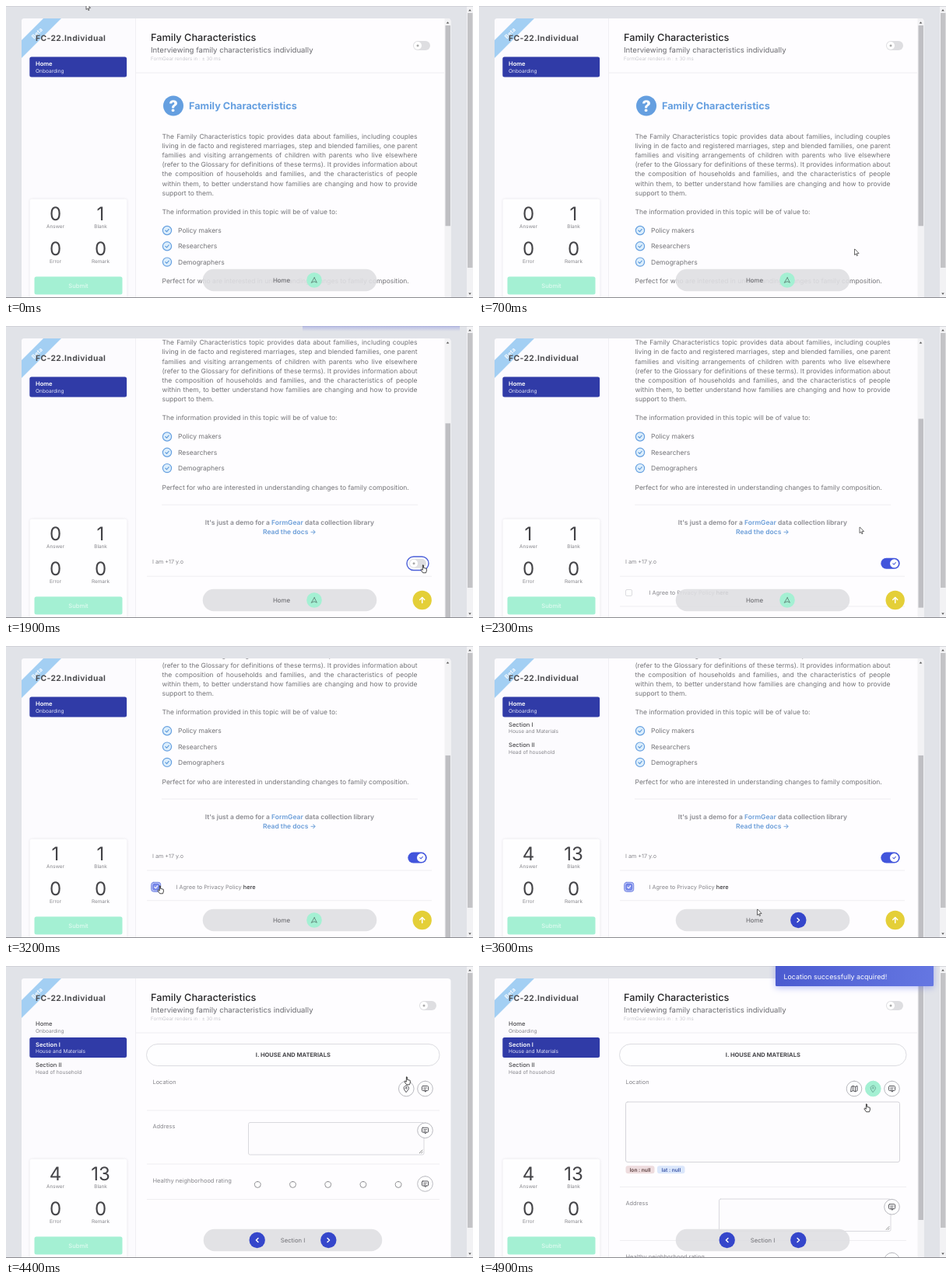
Animation, 600 px wide and 376 px high, one loop 5000 ms. Source, as an HTML page with a canvas:

```html
<!DOCTYPE html>
<html lang="en">
<head>
<meta charset="utf-8">
<title>Family Characteristics form</title>
<style>
html, body { margin: 0; width: 100%; height: 100%; overflow: hidden; background: #e1e3e8; }
canvas { display: block; width: 600px; height: 376px; }
</style>
</head>
<body>
<canvas id="stage"></canvas>
<script>
const canvas = document.getElementById('stage');
const ctx = canvas.getContext('2d');
const ratio = window.devicePixelRatio || 1;
canvas.width = 600 * ratio;
canvas.height = 376 * ratio;
ctx.textRendering = 'geometricPrecision';

const LOOP = 5000, STEP = 100;
const BLUE = '#303ba7', BUTTON = '#3546cb', SKY = '#659fe0', MINT = '#a4f0d3', LINE = '#efeef1';
const INK = '#4c4c4f', BODY = '#737377', SOFT = '#87878c';

// Keys: [time, value, ...]; values between keys are linear.
const SCROLL = [[800, 0], [1200, 43], [1500, 105], [1700, 146.5], [2300, 146.5], [2600, 179.7]];
const PAGE = [[3800, 0], [4000, -13], [4200, -13], [4400, 0]];
const TOAST = [[4600, -30], [4900, 0]];
const MOUSE = [[0, 103, -3], [300, 240, 110], [600, 478, 316], [800, 487, 310], [1200, 527, 224],
  [1500, 529, 240], [1900, 535, 308], [2000, 535, 308], [2300, 489, 259], [2600, 340, 280],
  [3000, 197, 309], [3300, 197, 309], [3700, 411, 349], [3800, 411, 349], [4100, 391, 318],
  [4400, 514, 143], [4600, 512, 152], [4900, 497, 178]];

const PARAGRAPH = [
  'The Family Characteristics topic provides data about families, including couples',
  'living in de facto and registered marriages, step and blended families, one parent',
  'families and visiting arrangements of children with parents who live elsewhere',
  '(refer to the Glossary for definitions of these terms). It provides information about',
  'the composition of households and families, and the characteristics of people',
  'within them, to better understand how families are changing and how to provide',
  'support to them.'
];

function track(keys, t, i = 1) {
  if (t <= keys[0][0]) return keys[0][i];
  for (let k = 1; k < keys.length; k++) {
    const a = keys[k - 1], b = keys[k];
    if (t <= b[0]) {
      const p = (t - a[0]) / (b[0] - a[0]);
      return a[i] + (b[i] - a[i]) * p;
    }
  }
  return keys[keys.length - 1][i];
}

function setFont(size, weight) {
  ctx.font = `${weight} ${size}px Inter, sans-serif`;
}

// y is the middle of the capitals.
function text(str, x, y, size, color = INK, weight = 400, align = 'left') {
  setFont(size, weight);
  ctx.fillStyle = color;
  ctx.textAlign = align;
  ctx.fillText(str, x, y + size * 0.35);
}

function justified(str, x, y, width, size, color) {
  setFont(size, 400);
  const words = str.split(' ');
  const widths = words.map(w => ctx.measureText(w).width);
  const gap = (width - widths.reduce((a, b) => a + b, 0)) / (words.length - 1);
  words.forEach((w, i) => {
    text(w, x, y, size, color);
    x += widths[i] + gap;
  });
}

function box(x, y, w, h, r, fill, stroke, lineWidth = 1) {
  ctx.beginPath();
  ctx.roundRect(x, y, w, h, r);
  if (fill) { ctx.fillStyle = fill; ctx.fill(); }
  if (stroke) { ctx.strokeStyle = stroke; ctx.lineWidth = lineWidth; ctx.stroke(); }
}

function disc(x, y, r, fill, stroke, lineWidth = 1) {
  box(x - r, y - r, r * 2, r * 2, r, fill, stroke, lineWidth);
}

function path(points, stroke, lineWidth = 1, fill, closed) {
  ctx.beginPath();
  points.forEach(([x, y]) => ctx.lineTo(x, y));
  if (closed) ctx.closePath();
  if (fill) { ctx.fillStyle = fill; ctx.fill(); }
  if (stroke) {
    ctx.strokeStyle = stroke;
    ctx.lineWidth = lineWidth;
    ctx.lineJoin = ctx.lineCap = 'round';
    ctx.stroke();
  }
}

function at(x, y, draw) {
  ctx.save();
  ctx.translate(x, y);
  draw();
  ctx.restore();
}

function rule(x1, x2, y) {
  ctx.fillStyle = LINE;
  ctx.fillRect(x1, y - 0.5, x2 - x1, 1);
}

function tick(x, y, s, color) {
  path([[x - s, y], [x - s * 0.2, y + s * 0.75], [x + s, y - s * 0.7]], color, 1.1);
}

function toggleOff(x, y) {
  box(x - 11, y - 6, 22, 12, 6, '#dedee1');
  disc(x - 5, y, 5, '#fff');
  disc(x - 5, y, 1.5, '#aaa');
}

function toggleOn(x, y) {
  box(x - 12.2, y - 7, 24.4, 14, 7, '#4255dc');
  disc(x + 5, y, 5.5, '#fff');
  tick(x + 5, y, 1.8, '#5a6ade');
}

function roundButton(x, y, icon, active) {
  disc(x, y, 9.8, active ? MINT : '#fefeff', active ? MINT : '#b9b9bf');
  at(x, y, () => icon(active ? '#6fae9b' : '#55555a'));
}

function noteIcon(c) {
  box(-4, -3.5, 8, 6, 1, null, c);
  path([[-2, -1.2], [2, -1.2]], c, 0.8);
  path([[-2, 0.6], [1, 0.6]], c, 0.8);
  path([[-1, 2.6], [0.3, 4.2], [1.6, 2.6]], c, 1);
}

function pinIcon(c) {
  ctx.beginPath();
  ctx.arc(0, -0.8, 3.2, Math.PI * 0.85, Math.PI * 0.15);
  ctx.lineTo(0, 4.4);
  ctx.closePath();
  ctx.strokeStyle = c;
  ctx.lineWidth = 1;
  ctx.stroke();
  disc(0, -0.8, 1, null, c, 0.9);
}

function mapIcon(c) {
  path([[-4, -2.5], [-1.4, -3.6], [1.4, -2.5], [4, -3.6], [4, 2.6], [1.4, 3.7], [-1.4, 2.6], [-4, 3.7]], c, 1, null, true);
  path([[-1.4, -3.6], [-1.4, 2.6]], c);
  path([[1.4, -2.5], [1.4, 3.7]], c);
}

function drawScrollbar(x, top, thumbTop, thumbEnd, thumb) {
  ctx.fillStyle = '#f2f2f4';
  ctx.fillRect(x, top, 8, 376 - top);
  ctx.fillStyle = thumb;
  ctx.fillRect(x + 1, thumbTop, 6.5, thumbEnd - thumbTop);
  path([[x + 2.2, top + 6.5], [x + 4, top + 4.3], [x + 5.8, top + 6.5]], null, 0, '#555', true);
}

function drawSidebar(s) {
  ctx.fillStyle = '#fcfbfe';
  ctx.fillRect(20, 16, 146, 380);
  ctx.fillStyle = '#f0eff3';
  ctx.fillRect(166, 16, 1, 380);

  const items = [['Home', 'Onboarding']];
  if (s.unlocked) items.push(['Section I', 'House and Materials'], ['Section II', 'Head of household']);
  items.forEach(([name, detail], i) => {
    const y = 65.5 + i * 26.4;
    const active = i === (s.section ? 1 : 0);
    if (active) box(30.3, y, 124.8, 26, 2.5, BLUE);
    text(name, 38, y + 9.3, 7.6, active ? '#fff' : INK, active ? 600 : 500);
    text(detail, 38, y + 18.2, 6.6, active ? '#dfe1f6' : SOFT);
  });

  ctx.save();
  ctx.shadowColor = 'rgba(40,40,60,.13)';
  ctx.shadowBlur = 3 * ratio;
  box(30.5, 248.5, 125, 128, 3, '#fefeff');
  ctx.restore();
  const counts = [[s.answers, 'Answer'], [s.blanks, 'Blank'], [0, 'Error'], [0, 'Remark']];
  counts.forEach(([n, label], i) => {
    const x = i % 2 ? 121.5 : 63.5, y = 267.5 + (i > 1 ? 45 : 0);
    text(n, x, y, 24, '#434347', 400, 'center');
    text(label, x, y + 16, 6.4, SOFT, 400, 'center');
  });
  box(36.5, 348.5, 113, 23, 2.5, MINT);
  text('Submit', 93, 360, 7.6, '#dffaf0', 500, 'center');

  path([[20, 44], [48, 16], [71, 16], [20, 67]], null, 0, '#a3cff3', true);
  at(40, 35, () => {
    ctx.rotate(-Math.PI / 4);
    text('Beta', 0, 0, 7.5, '#fff', 600, 'center');
  });
  ctx.letterSpacing = '0.4px';
  text('FC-22.Individual', 38, 41.7, 10.3, INK, 700);
  ctx.letterSpacing = '0px';
}

function drawHeader(s) {
  text('Family Characteristics', 186, 41, 12.75, '#262628', 500);
  text('Interviewing family characteristics individually', 186, 56.5, 9.6, '#6b6b70');
  text(`FormGear renders in : ± ${s.page < 0 ? 10 : 30} ms`, 186, 67.3, 6.3, '#b9b9be', 300);
  toggleOff(s.right - 29, 51);
  rule(167, s.right, 86);
}

function drawHome(s) {
  disc(215, 128.5, 13, SKY);
  text('?', 215, 128.5, 20, '#fff', 800, 'center');
  text('Family Characteristics', 235, 128.5, 12.7, SKY, 700);

  PARAGRAPH.forEach((line, i) => {
    const y = 167.8 + i * 12.15;
    if (i < PARAGRAPH.length - 1) justified(line, 200.5, y, 328, 8.5, BODY);
    else text(line, 200.5, y, 8.5, BODY);
  });
  text('The information provided in this topic will be of value to:', 200.5, 265, 8.5, BODY);
  ['Policy makers', 'Researchers', 'Demographers'].forEach((name, i) => {
    const y = 289 + i * 20.3;
    disc(207, y, 5.6, '#dceefc', SKY, 1.2);
    tick(207, y, 2.2, '#5a97da');
    text(name, 221, y, 8.5, BODY);
  });
  text('Perfect for who are interested in understanding changes to family composition.', 200.5, 354.3, 8.5, BODY);
  rule(200, 529, 376.7);

  const parts = [["It's just a demo for a ", '#8a8a90'], ['FormGear', '#6a9dd8'], [' data collection library', '#8a8a90']];
  setFont(8.5, 600);
  const widths = parts.map(p => ctx.measureText(p[0]).width);
  let x = 364.3 - widths.reduce((a, b) => a + b, 0) / 2;
  parts.forEach(([str, color], i) => {
    text(str, x, 399.7, 8.5, color, 600);
    x += widths[i];
  });
  text('Read the docs →', 364.3, 411.8, 8.5, '#6a9dd8', 600, 'center');

  text('I am +17 y.o', 188, 450.3, 7.2, SOFT);
  if (s.adult) toggleOn(528.5, 452.3);
  else {
    if (s.focus) box(515, 443.5, 28, 17.5, 9, '#fff', '#4b5fd8', 1.4);
    toggleOff(529, 452.3);
  }
  rule(181, 547, 468.7);

  if (!s.adult) return;
  if (s.agreed) {
    box(186.7, 484, 12, 12, 3, '#b9c3f6', '#6f80e2', 1);
    box(188.9, 486.2, 7.6, 7.6, 1.5, '#8291ec', '#5468e0', 0.8);
    tick(192.7, 490, 2, '#fff');
  } else box(188.5, 486, 8, 8, 1.5, '#fff', '#dcdce0');
  const agree = 'I Agree to Privacy Policy ';
  text(agree, 218.5, 489.8, 7.35, SOFT);
  const end = 218.5 + ctx.measureText(agree).width;
  text('here', end, 489.8, 7.35, '#38383c', 500);
  rule(181, 547, 507.5);
}

function drawSection(s) {
  const r = s.right, shift = s.located ? 98.5 : 0;
  box(180.5, 100.5, r - 194.5, 28, 14, '#fefeff', '#dcdce1');
  text('I. HOUSE AND MATERIALS', r / 2 + 83.3, 114.7, 7.5, '#48484c', 700, 'center');

  text('Location', 188.5, 149.5, 7.4, SOFT);
  if (s.located) roundButton(r - 81, 158, mapIcon);
  roundButton(r - 56.7, 158, pinIcon, s.located);
  roundButton(r - 32.5, 158, noteIcon);
  if (s.located) {
    box(188.5, 175, 352, 77.5, 2.5, '#fdfcfe', '#d5d5da');
    box(188.5, 257.3, 37, 10, 3, '#eedcde');
    text('lon : null', 207, 262.3, 6.6, '#5c4040', 600, 'center');
    box(229, 257.3, 35.5, 10, 3, '#dbe7fb');
    text('lat : null', 246.8, 262.3, 6.6, '#3c56a8', 600, 'center');
  }
  rule(181, r - 14, 186 + shift);

  at(0, shift, () => {
    text('Address', 188.5, 206.5, 7.4, SOFT);
    const x = s.located ? 308.5 : 311.5, end = r - 34;
    box(x, 201.5, end - x, 41.5, 2, '#fdfcfe', '#d9d9de');
    path([[end - 6, 241], [end - 2, 237]], '#777', 0.8);
    path([[end - 3.5, 241], [end - 2, 239.5]], '#777', 0.8);
    roundButton(r - 32.5, 211.7, noteIcon);
    rule(181, r - 14, 255);
    text('Healthy neighborhood rating', 188.5, 276, 7.5, SOFT);
    for (let i = 0; i < 5; i++) disc(323.3 + i * 45.2, 281.5, 3.9, '#fff', '#85858a', 0.9);
    roundButton(r - 32.5, 280.5, noteIcon);
    rule(181, r - 14, 300.5);
  });
}

function arrowButton(x, y, dir) {
  disc(x, y, 10.2, BUTTON);
  path([[x - dir * 1.3, y - 2.6], [x + dir * 1.3, y], [x - dir * 1.3, y + 2.6]], '#fff', 1.4);
}

function drawNav(s) {
  const cx = (166 + s.right) / 2, y = s.page < 0 ? 353 + s.page * 1.27 : 353;
  const w = s.right > 565 ? 229.5 : 223.5;
  box(cx - w / 2, y - 14.2, w, 28.4, 14.2, 'rgba(223,223,227,.9)');
  if (s.section) {
    arrowButton(cx - 45.8, y, -1);
    text('Section I', cx, y, 7.7, '#707075', 400, 'center');
    arrowButton(cx + 45.8, y, 1);
    return;
  }
  text('Home', 343, y, 7.9, '#606065');
  if (s.unlocked) arrowButton(cx + 45.8, y, 1);
  else {
    disc(396, y, 9.8, MINT);
    path([[396, y - 3.6], [399.4, y + 3.2], [396, y + 1.7], [392.6, y + 3.2]], '#5f8478', 0.9, null, true);
  }
  if (s.scroll > 80) {
    disc(534.7, 353, 12.2, '#e4cf38');
    path([[534.7, 356.5], [534.7, 349.8]], '#fff', 1.5);
    path([[531.7, 352.5], [534.7, 349.5], [537.7, 352.5]], '#fff', 1.5);
  }
}

function drawToast(y, label) {
  const fill = ctx.createLinearGradient(381, 0, 584, 26);
  fill.addColorStop(0, '#4b5bd0');
  fill.addColorStop(1, '#6577e2');
  ctx.save();
  ctx.shadowColor = 'rgba(77,96,232,.4)';
  ctx.shadowBlur = 9 * ratio;
  ctx.shadowOffsetY = 2 * ratio;
  box(381, y - 6, 203, 32, 1.5, fill);
  ctx.restore();
  text(label, 391.5, y + 14, 8.9, '#fff');
}

function drawMouse(t) {
  const x = track(MOUSE, t, 1), y = track(MOUSE, t, 2);
  const hand = (t >= 1800 && t <= 2100) || (t >= 2900 && t <= 3300) || (t >= 3700 && t <= 3900) || t >= 4400;
  const beam = t >= 900 && t <= 1500;
  at(x, y, () => {
    if (beam) {
      path([[-1.5, -3.5], [1.5, -3.5]], '#444', 0.9);
      path([[0, -3.5], [0, 3.5]], '#444', 0.9);
      path([[-1.5, 3.5], [1.5, 3.5]], '#444', 0.9);
    } else if (hand) {
      path([[0, 0], [1.4, 0], [1.6, 3.4], [5.2, 4.3], [5.4, 7], [4.5, 9.8], [0.6, 9.8], [-2.2, 5.8], [-1.2, 5], [0, 6]],
        '#333', 0.9, '#fff', true);
    } else {
      path([[0, 0], [0, 7.6], [1.7, 6.1], [2.9, 8.7], [4, 8.2], [2.9, 5.7], [5.2, 5.5]], '#444', 0.8, '#fff', true);
    }
  });
}

function stateAt(t) {
  const section = t >= 3800, located = t >= 4500, unlocked = t >= 3300;
  return {
    section, located, unlocked,
    scroll: section ? 0 : track(SCROLL, t),
    page: track(PAGE, t),
    right: section && !located ? 571 : 563,
    focus: t >= 1900,
    adult: t >= 2100,
    agreed: t >= 3100,
    answers: unlocked ? 4 : t >= 2100 ? 1 : 0,
    blanks: unlocked ? 13 : 1
  };
}

function draw(t) {
  const s = stateAt(t);
  ctx.setTransform(ratio, 0, 0, ratio, 0, 0);
  ctx.fillStyle = '#e1e3e8';
  ctx.fillRect(0, 0, 600, 376);

  at(0, s.page, () => {
    ctx.save();
    ctx.beginPath();
    ctx.roundRect(20, 16, 551.5, 400, 4);
    ctx.clip();
    ctx.fillStyle = '#fefdff';
    ctx.fillRect(20, 16, 552, 400);
    at(0, -s.scroll, () => {
      drawHeader(s);
      if (s.section) drawSection(s);
      else drawHome(s);
    });
    drawSidebar(s);
    if (s.right < 565) {
      const scale = s.adult ? 0.645 : 0.685;
      const top = 25 + s.scroll * scale;
      drawScrollbar(563.5, 16, top, top + (s.located ? 302 : 377 * scale), '#bfbfc3');
    }
    ctx.restore();
  });
  drawNav(s);

  drawScrollbar(592, 0, 9 - s.page * 0.9, 337 - s.page * 0.9, '#c3c3c6');
  path([[594.2, 369.5], [596, 371.7], [597.8, 369.5]], null, 0, '#555', true);
  ctx.fillStyle = '#c9cbd0';
  ctx.fillRect(0, 0, 600, 0.7);
  ctx.fillStyle = '#8b8b90';
  ctx.fillRect(0, 375, 600, 1);

  if (t >= 1800 && t <= 2000) {
    const glow = ctx.createLinearGradient(0, 0, 0, 7);
    glow.addColorStop(0, 'rgba(140,148,225,.5)');
    glow.addColorStop(1, 'rgba(140,148,225,0)');
    ctx.fillStyle = glow;
    ctx.fillRect(381, 0, 202, 7);
  }
  if (t > 4600) drawToast(track(TOAST, t), 'Location successfully acquired!');
  drawMouse(t);
}

function frame(now) {
  draw(Math.floor((now % LOOP) / STEP) * STEP);
  requestAnimationFrame(frame);
}
requestAnimationFrame(frame);
</script>
</body>
</html>
```
